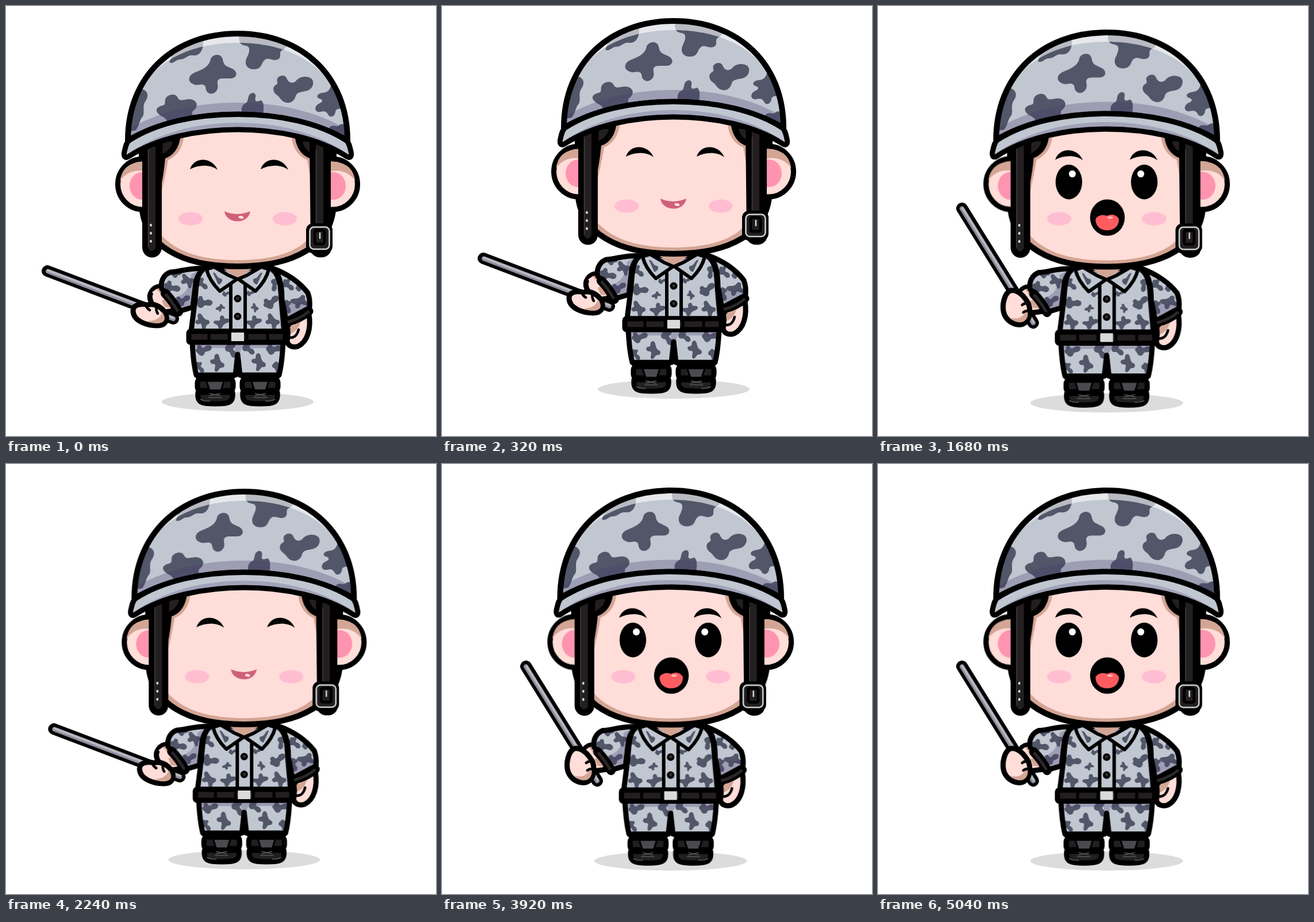
An HTML page without scripts that plays this animation: 748 by 748 pixels, repeating every 5400 ms.

```html
<!DOCTYPE html>
<html lang="en">
<head>
<meta charset="utf-8">
<title>Little soldier</title>
<style>
html, body { margin: 0; width: 100%; height: 100%; overflow: hidden; background: #fff; }
svg { display: block; width: 100%; height: 100%; }
.ink { stroke: #000; stroke-width: 9; stroke-linejoin: round; stroke-linecap: round; }
.bold { stroke-width: 10; }
.thin { stroke-width: 6; }
.crease { stroke-width: 4.5; }
.line { fill: none; }
.skin { fill: #ffddd8; }
.tan { fill: #d3a594; }
.cloth { fill: #c1c7d1; }
.spots { fill: #515668; }
.shade { fill: #4b3c6e; opacity: .3; }
.dark { fill: #231f20; }
.cuff { stroke: #2c2728; stroke-width: 5; }
.baton { stroke-linecap: round; fill: none; }
.rise { animation: rise 5.4s infinite; }
.pose { animation: pose 5.4s step-end infinite; }
.calm { animation: calm 5.4s step-end infinite; }
.shout { animation: shout 5.4s step-end infinite; }
@keyframes rise {
  0% { transform: translateY(0); animation-timing-function: steps(8); }
  5.92% { transform: translateY(-22px); animation-timing-function: step-end; }
  10.37%, 100% { transform: translateY(0); }
}
@keyframes pose {
  0% { transform: translate(0, 0) scale(1); }
  10.37% { transform: translate(4.1px, -2.4px) scale(1.0065); }
  20.74%, 41.48%, 62.22%, 82.96% { transform: translate(11.3px, 0) scale(1); }
  31.11%, 51.85%, 72.59%, 93.33% { transform: translate(-7.9px, -2.4px) scale(1.0065); }
}
@keyframes calm {
  0%, 20.74%, 41.48%, 62.22%, 82.96% { visibility: visible; }
  10.37%, 31.11%, 51.85%, 72.59%, 93.33% { visibility: hidden; }
}
@keyframes shout {
  0%, 20.74%, 41.48%, 62.22%, 82.96% { visibility: hidden; }
  10.37%, 31.11%, 51.85%, 72.59%, 93.33% { visibility: visible; }
}
</style>
</head>
<body>
<svg viewBox="0 0 748 748">
<defs>
  <path id="blob" transform="translate(-360 -118)" d="M356 92C360 83 375 82 377 93C379 104 383 104 391 108C405 113 403 126 390 126C375 126 366 124 368 136C371 148 360 156 352 151C345 147 350 139 343 137C336 135 332 140 324 135C315 130 318 120 328 116C340 111 354 106 356 92Z"/>
  <path id="lump" transform="translate(-500 -145)" d="M472 126C476 120 485 119 488 125C491 133 497 136 504 131C510 122 524 121 531 126C538 133 533 144 525 147C515 150 507 149 504 156C502 166 494 170 487 168C478 166 477 158 470 154C463 148 464 140 470 137C475 134 470 131 472 126Z"/>
  <path id="dome" d="M212 234C212 122 291 48 403 48S594 122 594 234C544 204 476 188.500 403 188.500S262 204 212 234Z"/>
  <path id="brim" d="M213 262C207 266 204 261 206 253C208 245 209 238 214 234C262 203 330 188.500 403 188.500S544 203 592 234C597 238 598 245 600 253C602 261 599 266 593 262C544 230 474 215 403 215S262 230 213 262Z"/>
  <path id="torso" d="M345 456C331 466 331 485 329 510L322 566H484L479 510C478 485 476 468 461 456Z"/>
  <path id="sleeveL" d="M345 457C322 454 300 463 286 463C274 467 268 480 271 492C281 501 294 516 301 531L325 524L329 490C330 475 334 465 345 457Z"/>
  <path id="sleeveR" d="M463 456C490 466 512 482 525 499C528 507 529 515 528 525L487 547L480 510C480 480 474 464 463 456Z"/>
  <path id="pants" d="M324 584C325 606 327 626 331 642H399L403 606L407 642H475C479 626 481 606 482 584Z"/>
  <path id="brow" d="M320 284C327 262 358 262 368 285C356 275.500 336 275.500 320 284Z"/>
  <clipPath id="inDome"><use href="#dome"/></clipPath>
  <clipPath id="inBrim"><use href="#brim"/></clipPath>
  <clipPath id="inTorso"><use href="#torso"/></clipPath>
  <clipPath id="inSleeveL"><use href="#sleeveL"/></clipPath>
  <clipPath id="inSleeveR"><use href="#sleeveR"/></clipPath>
  <clipPath id="inPants"><use href="#pants"/></clipPath>
  <clipPath id="outside"><rect x="180" y="250" width="63" height="120"/></clipPath>

  <g id="ear" clip-path="url(#outside)">
    <ellipse class="ink skin" cx="238" cy="310" rx="43.500" ry="44"/>
    <path class="tan" d="M198.500 304C202 281 216 270.500 244 270.500V288C224 283 208 290 198.500 304Z"/>
    <ellipse cx="237" cy="313" rx="22" ry="24" fill="#ff94b0"/>
  </g>
  <g id="hair">
    <path class="tan" d="M264 230H309C306 250 296 262 282 268C279 285 275 305 270 326Z"/>
    <path d="M240 230H303C300 250 289 261 277 265C275 285 272 305 268 320L240 356Z"/>
    <path class="dark" d="M273 236H290C288 246 281 253 272 257Z"/>
  </g>
  <g id="boot">
    <path class="ink dark" d="M334 672C332 690 340 692 364 692S396 690 394 672Z"/>
    <rect class="ink dark" x="333" y="649" width="62" height="20" rx="6"/>
    <path class="ink" d="M334 645H394"/>
    <path d="M351 654H377L373 667H355Z" fill="#4b4b4f"/>
    <path d="M349 653L354 669H374L379 653" class="line" stroke="#000" stroke-width="3"/>
    <path d="M354 674L373 678M373 674L354 678M352 681H375" class="line" stroke="#58595d" stroke-width="1.300"/>
    <path d="M338 684Q345 688 355 687" class="line" stroke="#5b5b60" stroke-width="1.500"/>
  </g>
  <g id="collar">
    <path class="ink cloth thin" d="M349 458C352 472 362 486 372 496L402 475L386 468L362 454Z"/>
    <path class="spots" d="M360 464C366 462 366 474 374 474C380 477 372 486 369 484Z"/>
  </g>
</defs>

<g class="rise"><g class="pose">
  <ellipse cx="403" cy="688.500" rx="132" ry="16.500" fill="#dcdcdc"/>

  <!-- resting hand -->
  <path class="ink skin" d="M492 552L527 536C531 560 525 584 508 592C498 595 491 591 489 584Z"/>
  <path class="tan" d="M494 558L512 549C510 560 503 567 495 570Z"/>
  <path class="ink line crease" d="M493 577C502 578 507 571 509 563"/>

  <use href="#boot"/>
  <use href="#boot" transform="matrix(-1 0 0 1 806 0)"/>

  <use href="#pants" class="cloth"/>
  <g clip-path="url(#inPants)">
    <g class="spots">
      <use href="#lump" transform="translate(344 599) scale(.4)"/>
      <use href="#blob" transform="translate(368 621) rotate(100) scale(.38)"/>
      <use href="#lump" transform="translate(336 629) rotate(70) scale(.3)"/>
      <use href="#lump" transform="translate(391 599) rotate(80) scale(.4)"/>
      <use href="#blob" transform="translate(440 620) rotate(100) scale(.38)"/>
      <use href="#lump" transform="translate(466 598) rotate(10) scale(.4)"/>
      <use href="#lump" transform="translate(470 629) rotate(90) scale(.3)"/>
      <use href="#lump" transform="translate(421 597) rotate(60) scale(.36)"/>
    </g>
    <path class="shade" d="M320 584H490V595H410L404 612L397 595H320Z"/>
  </g>
  <use href="#pants" class="ink line"/>

  <!-- raised forearm and sleeves -->
  <path class="ink skin" d="M252 514C246 500 257 488 268 488L294 530L264 534Z"/>
  <path class="tan" d="M262 492L270 490L292 526L276 524Z"/>
  <path class="skin" d="M254 498L262 492L276 510L268 514Z"/>

  <use href="#sleeveL" class="cloth"/>
  <g clip-path="url(#inSleeveL)">
    <g class="spots">
      <use href="#lump" transform="translate(288 491) rotate(30) scale(.42)"/>
      <use href="#blob" transform="translate(316 478) rotate(70) scale(.34)"/>
      <use href="#lump" transform="translate(308 513) rotate(-10) scale(.38)"/>
      <use href="#lump" transform="translate(297 467) scale(.26)"/>
    </g>
    <path class="shade" d="M345 455L322 467C320 490 312 502 294 507L304 535L330 526Z"/>
  </g>
  <use href="#sleeveL" class="ink line"/>
  <path class="ink line" style="stroke-width:16" d="M277 500C286 509 294 520 300 532"/>
  <path class="line cuff" d="M277 501C286 510 292 520 299 531"/>

  <use href="#sleeveR" class="cloth"/>
  <g clip-path="url(#inSleeveR)">
    <g class="spots">
      <use href="#lump" transform="translate(490 486) rotate(60) scale(.34)"/>
      <use href="#blob" transform="translate(511 514) rotate(20) scale(.38)"/>
      <use href="#lump" transform="translate(488 523) rotate(90) scale(.34)"/>
      <use href="#lump" transform="translate(512 491) scale(.24)"/>
    </g>
    <path class="shade" d="M475 520L530 513V530L486 550Z"/>
  </g>
  <use href="#sleeveR" class="ink line"/>
  <path class="ink line" style="stroke-width:15" d="M489 550C504 546 517 540 527 531"/>
  <path class="line cuff" d="M490 550C504 546 517 540 527 531"/>

  <use href="#torso" class="cloth"/>
  <g clip-path="url(#inTorso)">
    <g class="spots">
      <use href="#lump" transform="translate(344 517) rotate(20) scale(.42)"/>
      <use href="#blob" transform="translate(373 525) scale(.2)"/>
      <use href="#lump" transform="translate(340 484) rotate(60) scale(.34)"/>
      <use href="#blob" transform="translate(342 549) rotate(80) scale(.36)"/>
      <use href="#blob" transform="translate(375 550) rotate(180) scale(.34)"/>
      <use href="#lump" transform="translate(383 501) scale(.2)"/>
      <use href="#lump" transform="translate(462 516) rotate(-20) scale(.42)"/>
      <use href="#blob" transform="translate(433 525) rotate(90) scale(.2)"/>
      <use href="#blob" transform="translate(431 550) rotate(180) scale(.34)"/>
      <use href="#blob" transform="translate(464 549) rotate(80) scale(.36)"/>
      <use href="#lump" transform="translate(467 484) rotate(120) scale(.34)"/>
      <use href="#lump" transform="translate(425 500) scale(.2)"/>
    </g>
    <path class="shade" d="M326 452H482V464H326ZM472 490H486V566H478Z"/>
  </g>
  <use href="#torso" class="ink line"/>
  <path class="ink line thin" d="M391 480V562M416 480V562"/>
  <path class="tan" d="M372 452H434L403 475Z"/>
  <use href="#collar"/>
  <use href="#collar" transform="matrix(-1 0 0 1 806 0)"/>
  <circle cx="403" cy="509" r="6.500"/><circle cx="403" cy="540" r="6.500"/>
  <g fill="#343032"><circle cx="403" cy="508.500" r="2.600"/><circle cx="403" cy="539.500" r="2.600"/></g>

  <rect class="ink dark" x="318" y="566" width="168" height="19" rx="3"/>
  <path class="line" stroke="#000" stroke-width="5" d="M353 566V585M388 566V585M419 566V585M455 566V585"/>
  <rect x="392" y="568" width="22" height="15" fill="#dadada"/>

  <!-- head -->
  <path class="ink tan bold" d="M236 240V340C236 420 310 453 403 453S570 420 570 340V240Z"/>
  <path class="skin" d="M268 215V396C298 432 350 442 403 442S508 432 534 396V215Z"/>
  <use href="#hair"/>
  <use href="#hair" transform="matrix(-1 0 0 1 806 0)"/>
  <use href="#ear"/>
  <use href="#ear" transform="matrix(-1 0 0 1 806 0)"/>

  <path d="M237 235H271V420A16.500 17 0 0 1 237 420Z"/>
  <path class="dark" d="M247 240H260V421Q253 432 247 421Z"/>
  <path d="M247.500 250V420" stroke="#444042" stroke-width="1.500"/>
  <path d="M252 380.500V382M252 394.500V396M252 408.500V410" stroke="#d8d8d8" stroke-width="3.600" stroke-linecap="round"/>

  <path d="M528 235H565V424A17 13 0 0 1 530 424Z"/>
  <path class="dark" d="M539 240H552V380H539Z"/>
  <path d="M539.500 250V378" stroke="#444042" stroke-width="1.500"/>
  <rect x="522" y="378" width="46" height="52" rx="12"/>
  <rect class="dark" x="528.500" y="384.500" width="34" height="38.500" rx="7" stroke="#cdd0cf" stroke-width="2.600"/>
  <rect x="537" y="390" width="17" height="24" rx="3" class="dark" stroke="#000" stroke-width="5"/>
  <path d="M546 395V404" stroke="#dcdcdc" stroke-width="2.400" stroke-linecap="round"/>

  <!-- helmet -->
  <use href="#dome" class="cloth"/>
  <g clip-path="url(#inDome)">
    <g class="spots">
      <path d="M343 60C344 75 338 87 326 86C316 84 314 92 303 93C296 92 292 102 284 98L300 60Z"/>
      <use href="#blob" transform="translate(360 118)"/>
      <path d="M405 50C405 66 408 67 417 69C428 71 422 84 418 92C414 104 422 111 433 110C446 109 444 98 450 94C456 88 463 97 473 93C482 88 472 80 482 76C488 74 490 66 490 50Z"/>
      <use href="#lump" transform="translate(500 145)"/>
      <path d="M566 135C564 146 560 150 551 151C542 152 538 158 545 161C552 163 552 167 544 170C534 176 538 186 547 184C555 182 558 184 561 190C566 196 573 190 573 184C574 178 580 178 592 180L585 135Z"/>
      <path d="M278 160C284 152 296 152 299 160C302 166 308 163 318 162C332 162 336 174 327 181C320 186 327 190 324 200H280C277 192 268 193 263 185C259 177 268 174 273 173C279 171 275 166 278 160Z"/>
      <path d="M423 155C427 149 436 150 434 159C432 167 437 167 443 164C449 166 449 176 447 190H412C407 178 411 172 417 169C422 166 420 160 423 155Z"/>
      <path d="M236 144C248 148 248 157 243 165C236 174 242 184 238 192C232 198 233 206 226 216L205 220V170Z"/>
      <path d="M562 212C568 204 576 212 580 207C584 203 590 207 598 205V232H578C575 222 560 220 562 212Z"/>
    </g>
    <path class="shade" d="M205 240L218 212C270 182 335 168 403 168S536 182 588 212L600 240L403 200Z"/>
    <path fill="#fff" opacity=".6" d="M228 160C254 96 322 64 403 64S552 96 578 160L600 100L403 30L206 100Z"/>
  </g>
  <use href="#dome" class="ink line bold"/>
  <use href="#brim" class="cloth"/>
  <path clip-path="url(#inBrim)" fill="#a2a3b9" d="M206 262C262 219 335 203 403 203S544 219 600 262V270L403 222L206 270Z"/>
  <use href="#brim" class="ink line"/>

  <!-- face -->
  <g fill="#ffbdd2">
    <ellipse cx="321" cy="370" rx="21" ry="11.500"/>
    <ellipse cx="485" cy="370" rx="21" ry="11.500"/>
  </g>

  <g class="calm">
    <use href="#brow"/>
    <use href="#brow" x="123"/>
    <path d="M380 357C395 364 412 363 425 357C423 368 414 375 402 374.500C390 374 381 367 380 357Z" fill="#d0607a"/>
    <ellipse cx="409" cy="367.500" rx="4.500" ry="2.300" fill="#ffe3e3" transform="rotate(12 409 367)"/>
    <path class="ink line" style="stroke-width:20" d="M72 461L291 544"/>
    <path class="baton" stroke="#8e8f9c" stroke-width="8" d="M73 461.500L291 544"/>
    <path class="baton" stroke="#b9bac3" stroke-width="3.500" d="M73 460L291 542.500"/>
    <path class="ink skin" d="M221 530C221 519 236 517 246 520C257 517 268 522 275 531C283 542 280 556 263 556C243 556 221 547 221 530Z"/>
    <path class="tan" d="M272 533C279 543 277 552 263 552C256 552 250 550 247 548C260 548 268 543 272 533Z"/>
    <path class="ink line crease" d="M243 520Q245 526 250 529M262 522Q260 529 264 535"/>
  </g>

  <g class="shout">
    <use href="#brow" x="-6" y="-16"/>
    <use href="#brow" x="123" y="-16"/>
    <ellipse cx="337.700" cy="306.500" rx="23" ry="30"/>
    <ellipse cx="468" cy="306.500" rx="23" ry="30"/>
    <g fill="#fff"><circle cx="343.700" cy="292.500" r="6"/><circle cx="462" cy="292.500" r="6"/></g>
    <ellipse cx="404.300" cy="368" rx="30" ry="31.500"/>
    <path d="M384 370C390 362 398 363 404 365C411 361 420 363 424 370C425 382 416 390 404 390S383 382 384 370Z" fill="#ff5c60"/>
    <ellipse cx="409" cy="368" rx="5" ry="2" fill="#ffb3b0"/>
    <path class="ink line" style="stroke-width:20" d="M153 352L276 550"/>
    <path class="baton" stroke="#8e8f9c" stroke-width="8" d="M153 352.500L276 550"/>
    <path class="baton" stroke="#b9bac3" stroke-width="3.500" d="M154 352L277 549"/>
    <path class="ink skin" d="M237 494C226 499 222 518 225 532C229 547 245 556 258 552C270 547 273 532 268 517C262 506 251 492 237 494Z"/>
    <path class="tan" d="M266 526C269 540 264 548 254 549C246 549 240 545 236 541C250 545 260 540 266 526Z"/>
    <path class="ink line crease" d="M268 516Q262 515 257 519M270 530Q263 528 259 532"/>
  </g>
</g></g>
</svg>
</body>
</html>
```
